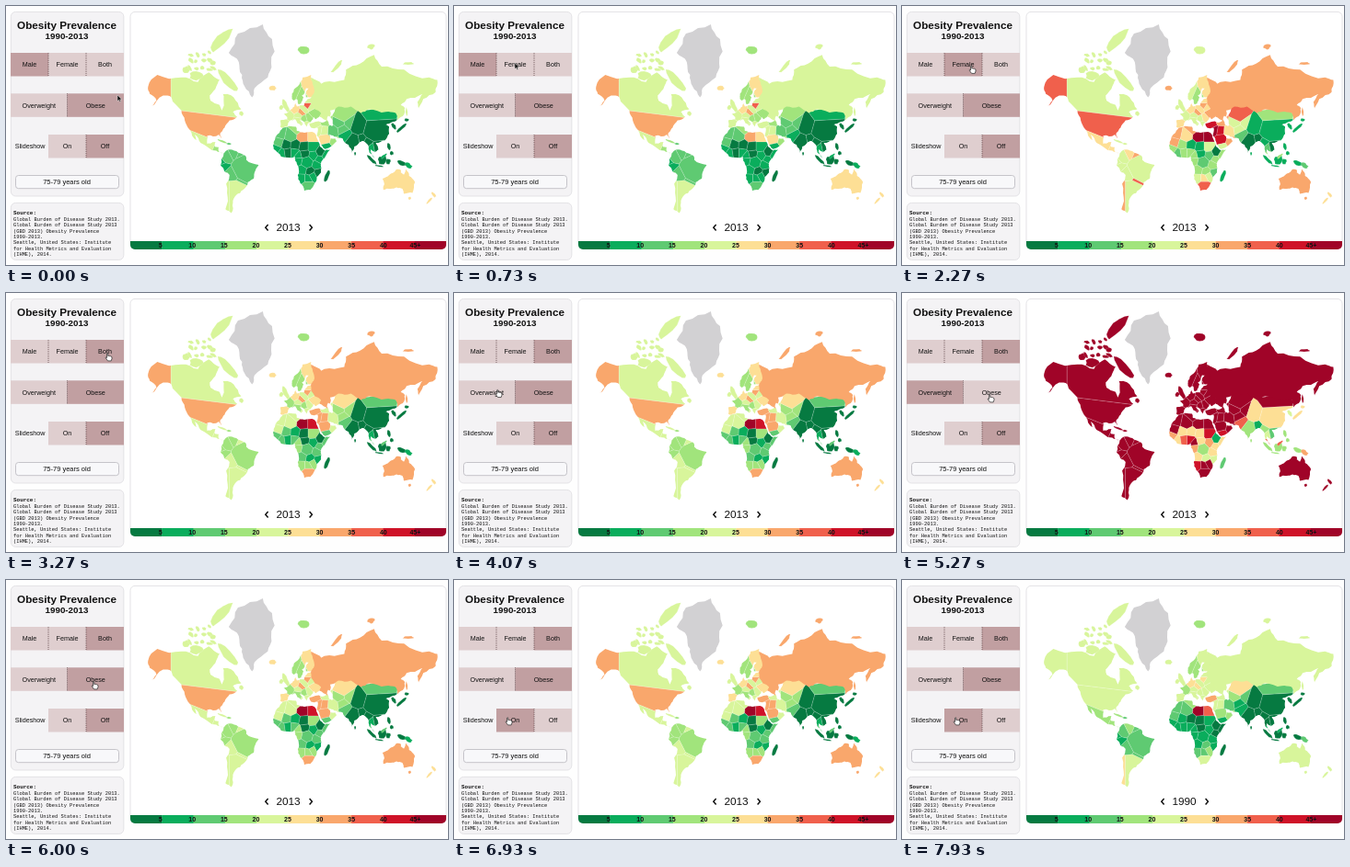
An HTML page that plays this animation: 480 px wide and 282 px high, repeating every 8 s.

```html
<!DOCTYPE html>
<html lang="en">
<head>
<meta charset="utf-8">
<title>Obesity Prevalence</title>
<style>
  html, body { margin: 0; width: 100%; height: 100%; overflow: hidden; background: #fefefe; }
  svg { display: block; width: 480px; height: 282px; }
  text { font-family: "Liberation Sans", Arial, sans-serif; fill: #111; }
  .mid { text-anchor: middle; }
  .ui { font-size: 7.2px; }
  .mono text { font-family: "Liberation Mono", "Courier New", monospace; font-size: 5.37px; }
  .panel { fill: #f4f3f5; stroke: #dddce0; stroke-width: .8; }
  .dots { stroke: #5d4548; stroke-width: .8; stroke-dasharray: 1 1; }
  #map path { stroke: #fff; stroke-opacity: .6; stroke-width: .25; stroke-linejoin: round; }
</style>
</head>
<body>
<svg viewBox="0 0 480 282">
  <defs id="defs">
    <clipPath id="foot"><rect x="135" y="240" width="343" height="25" rx="5"/></clipPath>
  </defs>
  <rect class="panel" x="5.4" y="6.4" width="122.4" height="200.6" rx="5"/>
  <text class="mid" x="66" y="24.5" font-size="11.7" font-weight="700">Obesity Prevalence</text>
  <text class="mid" x="66" y="36" font-size="9.8" font-weight="700">1990-2013</text>
  <g id="buttons"></g>
  <text class="ui" x="9.7" y="155.3">Slideshow</text>
  <rect x="10.5" y="184.5" width="112" height="14.2" rx="3" fill="#f8f8fa" stroke="#b9b8be" stroke-width=".8"/>
  <text class="mid" x="66" y="194.3" font-size="7.5">75-79 years old</text>

  <rect class="panel" x="5.4" y="214.4" width="122.4" height="62" rx="5"/>
  <g class="mono" id="notes">
    <text x="8" y="226.5" style="font-size:5.95px" font-weight="700">Source:</text>
  </g>

  <rect x="135" y="6.4" width="343" height="258.2" rx="5" fill="#fff" stroke="#dddce0" stroke-width=".8"/>
  <g id="map"></g>
  <g id="legend" clip-path="url(#foot)"></g>
  <text id="year" class="mid" x="306.5" y="245" font-size="11.8">2013</text>
  <path d="M284.6 238l-2.8 3.2 2.8 3.2M329.6 238l2.8 3.2-2.8 3.2" fill="none" stroke="#111" stroke-width="1.5"/>

  <path id="arrow" d="M0 0V6.6L1.6 5.2 2.7 7.6 3.8 7.1 2.7 4.8H4.8Z" fill="#111" stroke="#fff" stroke-width=".4"/>
  <path id="hand" d="M1.6.6Q2.2-.3 2.8.6V3Q4 2.5 4.6 3.2 5.6 2.9 6 3.7 7 3.6 7 4.6V6L6.2 8.4H2.6L.3 5.3Q0 4.3 .9 4.4L1.6 5Z" fill="#fff" stroke="#222" stroke-width=".7"/>
</svg>
<script>
const LOOP = 8000;
const palette = ['#067a41', '#0aad5c', '#5fca72', '#a1e47c', '#d8f59b',
                 '#fddf95', '#f9a76c', '#f0604c', '#cf1228', '#a00428'];
const $ = id => document.getElementById(id);

function add(parent, tag, attrs, text) {
  const el = document.createElementNS('http://www.w3.org/2000/svg', tag);
  for (const k in attrs) el.setAttribute(k, attrs[k]);
  if (text) el.textContent = text;
  parent.appendChild(el);
  return el;
}

let seed = 7;
const rnd = () => (seed = seed * 16807 % 2147483647) / 2147483647;

// Mercator
function project(lon, lat) {
  const k = 51.7, rad = Math.PI / 180;
  return [306 + k * lon * rad, 167.5 - k * Math.log(Math.tan(Math.PI / 4 + lat * rad / 2))];
}
const toPath = poly => 'M' + poly.map(p => p.map(v => v.toFixed(1)).join(' ')).join('L') + 'Z';

// Midpoint displacement turns a few key points into a rugged coast
function rough(poly, depth = 2) {
  if (!depth) return poly;
  return rough(poly.flatMap((a, i) => {
    const b = poly[(i + 1) % poly.length], j = (rnd() - .5) * .26;
    const dx = b[0] - a[0], dy = b[1] - a[1];
    return [a, [a[0] + dx / 2 - dy * j, a[1] + dy / 2 + dx * j]];
  }), depth - 1);
}

// Part of a polygon where the linear function f is negative
function cut(poly, f) {
  return poly.flatMap((a, i) => {
    const b = poly[(i + 1) % poly.length], fa = f(a), fb = f(b), out = fa <= 0 ? [a] : [];
    if (fa * fb < 0) out.push(a.map((v, n) => v + (b[n] - v) * fa / (fa - fb)));
    return out;
  });
}
const power = (s, p) => (p[0] - s.x) ** 2 + (p[1] - s.y) ** 2 - s.r ** 2;

const lands = [];
function land(parent, steps, poly) {
  if (poly.length) lands.push({ steps, el: add(parent, 'path', { d: toPath(poly) }) });
}

// A coast is shared out by nearest centre, weighted by radius.
// Each line: name, colour step in the five views, centre, radius.
// Views: men, women, both, overweight, 1990.
function region(coast, countries) {
  const shore = rough(coast.split(' ').map(p => project(...p.split(',').map(Number))));
  const id = 'coast' + lands.length;
  add(add($('defs'), 'clipPath', { id }), 'path', { d: toPath(shore) });
  const g = add($('map'), 'g', { 'clip-path': `url(#${id})` });
  const sites = countries.trim().split('\n').map(line => {
    const [, steps, lon, lat, r = 0] = line.trim().split(/\s+/);
    const [x, y] = project(+lon, +lat);
    return { steps, x, y, r: +r };
  });
  for (const s of sites) {
    let cell = [[130, 0], [480, 0], [480, 280], [130, 280]];
    for (const o of sites) if (o !== s) cell = cut(cell, p => power(s, p) - power(o, p));
    land(g, s.steps, cell);
  }
}

// Rugged ellipse: centre in degrees, half sizes in pixels, turn in degrees
function blob(lon, lat, a, b, turn = 0) {
  const [x, y] = project(lon, lat), c = Math.cos(turn * Math.PI / 180), s = Math.sin(turn * Math.PI / 180);
  return Array.from({ length: 12 }, (_, i) => {
    const t = i * Math.PI / 6, q = .8 + .4 * rnd(), u = a * q * Math.cos(t), v = b * q * Math.sin(t);
    return [x + u * c - v * s, y + u * s + v * c];
  });
}
const isle = (steps, ...shape) => land($('map'), steps, blob(...shape));

// Americas
region('-168,66 -157,71 -128,70 -108,68 -95,72 -82,69 -86,66 -94,61 -93,58 -82,55 -79,51 -77,56 -78,62 -73,62 -65,60 -56,52 -66,50 -61,46 -70,43 -76,36 -81,31 -80,25 -83,29 -97,28 -97,19 -90,21 -87,21 -88,16 -83,15 -83,10 -78,8 -86,11 -105,20 -112,29 -110,23 -118,34 -124,43 -128,51 -140,60 -150,61 -165,54 -158,58 -166,62', `
  Alaska   67694 -182 56 18
  Canada   44494 -99 56 18
  USA      67694 -102 40 18
  Mexico   45493 -112 18.5 18
  Isthmus  35493 -82 6`);
region('-77,8 -72,12 -62,10.5 -51,5 -50,0 -35,-6 -39,-13 -41,-22 -48,-26 -54,-34 -62,-39 -66,-46 -68,-54 -75,-51 -73,-37 -70,-18 -76,-14 -81,-6 -80,1', `
  Brazil    24392 -51 -10 15
  Argentina 44494 -65 -36 14
  Chile     46495 -76 -36 14
  Bolivia   24492 -67 -18 9
  Peru      14391 -76 -9 5
  Paraguay  27492 -58 -23 6.5
  Colombia  24392 -73 4 7
  Venezuela 25393 -65 8 7
  Ecuador   14391 -79 -1.5 4
  Guyana    26492 -58 5 6`);
region('-71,78 -60,82 -30,83.4 -19,81 -20,75 -24,70 -40,65 -43,60 -52,66 -55,71 -59,75.5', 'Greenland ----- -40 72');

// Africa
region('-6,36 10,37 11,33 20,31 32,31 37,21 43,12 51,12 44,2 40,-4 40,-15 35,-20 32,-28 27,-34 20,-35 15,-27 12,-18 13,-9 9,-1 9,4 -8,4 -17,13 -17,21 -10,31', `
  Morocco    26492 -8 30
  Algeria    25492 3 28 3
  Tunisia    36493 10 35
  Libya      69999 18 27
  Egypt      59897 30 27
  Mauritania 26492 -11 20
  Mali       03251 -2 17.5
  Niger      01150 9 17
  Chad       01050 19 15
  Sudan      14381 30 15
  Ethiopia   00010 39 9
  Somalia    13250 46 5
  Kenya      13250 38 .5
  Tanzania   13251 34.5 -6
  Uganda     12161 31 5
  Nigeria    13281 8 9
  Cameroon   13391 12.5 5
  Centre     01050 20 7
  Senegal    13261 -14 13
  Ivory      12251 -7 8
  Ghana      03171 -.5 9
  Gabon      13361 13 -1
  Congo      12231 23 -3 4
  Angola     13251 17.5 -12
  Zambia     03142 27 -14
  Mozambique 02141 36.5 -16
  Zimbabwe   14393 30 -19
  Namibia    14382 17 -22
  Botswana   15392 24 -22
  South      27694 24 -30 3`);

// Eurasia
region('26,40 41,41 50,45 60,56 78,56 90,51 120,54 133,48 131,43 122,40 118,39 122,37 122,30 117,23 106,20 109,12 105,9 100,13 104,2 98,9 97,17 91,22 87,21 80,16 77,8 73,18 66,25 56,27 49,30 51,25 57,25 59,22 45,13 39,21 35,28 36,36 28,36', `
  Turkey     48696 34 39
  Caucasus   36494 45 42
  Syria      49694 37 34
  Iraq       48694 44 33
  Saudi      58693 45 24 3
  Yemen      14281 47 15.5
  Oman       36493 56 21
  Iran       25492 54 32.5 3
  Uzbekistan 24393 62 40.5
  Kazakhstan 37595 67 48 6
  Kyrgyzstan 24392 74 41
  Afghan     24391 66 34
  Pakistan   12271 69 29
  India      00030 79 22 4
  Bangladesh 00010 90.5 24
  China      01050 104 34 11
  Xinjiang   01050 86 38 7
  Mongolia   13292 103 47 6
  Myanmar    01030 96 21 3
  Thailand   12140 101 15
  Vietnam    00020 106 16
  Malaysia   13271 102 4`);
region('-9,43 -1,44 -1,46 -5,48 2,51 8,54 9,57 11,54 20,55 21,57 24,59 30,60 33,54 40,50 40,47 34,44 31,46 28,42 24,40 23,37 19,42 13,45 18,40 16,38 9,44 3,43 -1,37 -6,36 -9,37', `
  Spain     45594 -4 40
  France    44393 2.5 47
  Italy     44394 12 43
  Germany   55595 9.5 51.5
  Alps      44494 13 47.5
  Czechia   66695 16 49.8
  Poland    45494 19.5 52
  Balkans   34394 20 44
  Greece    44494 22 39.5
  Romania   35494 25.5 45
  Ukraine   36594 32 49 3
  Belarus   45494 28 53.5
  Lithuania 76695 24 55
  Estonia   45594 24 58`);
region('28,70 41,67 35,64 44,68 68,69 70,73 87,75 104,77.5 113,74 140,73 170,70 180,69 178,63 163,59 157,51 156,57 162,62 143,59 136,55 141,53 140,48 132,43 130,49 118,50 98,52 88,49 76,54 61,54 51,51 48,42 38,46 40,49 28,56 28,60', 'Russia 46694 100 60');
region('5,59 5,62 12,66 18,70 28,71 30,67 31,62 27,60 22,60 22,63 25,65 22,65 17,61 19,60 16,56 13,55.5 11,59 7,58', `
  Norway  34393 9 63
  Sweden  33393 16.5 61.5
  Finland 55594 26 64`);
region('114,-22 122,-18 130,-12 136,-12 136,-15 140,-17.5 142,-11 146,-19 153,-26 150,-37 140,-38 138,-33 131,-31.5 124,-33 115,-34', 'Australia 56694 134 -25');
add($('map'), 'path', { d: toPath(blob(51, 42, 5.5, 2.4, 70)), fill: '#fff' });

// Arctic islands
isle('44494', -80, 80.8, 18, 6, -45);
isle('44494', -73, 69, 15, 4.5, 48);
isle('44494', -110, 70.7, 7, 4.5);
isle('44494', -122, 73, 4, 4);
for (let i = 0; i < 14; i++)
  isle('44494', -118 + i % 5 * 7 + rnd() * 4, 73 + Math.floor(i / 5) * 2.1 + rnd(), 2 + 2 * rnd(), 1.5 + rnd(), 60 * rnd());
isle('34393', 19, 78.7, 6, 4);
isle('46694', 59, 74, 9, 2, -50);
isle('46694', 100, 79.5, 4, 3);
isle('46694', 145, 75, 6, 1.5);
isle('46694', 143, 50, 4.5, 1, 85);

// Other islands
isle('44494', -56, 48.7, 2.6, 2.4);
isle('34493', -79, 21.8, 5, 1, 20);
isle('24392', -71, 19, 2.4, 1.1);
isle('56594', -18.5, 65, 4.5, 2.6);
isle('44494', -2.3, 54, 7.5, 2.5, 65);
isle('44494', -8, 53.3, 2.2, 2.6);
isle('01020', 47, -19, 6.8, 2.2, -68);
isle('01030', 81, 7.5, 1, 1.8);
isle('01040', 127.5, 37.5, 4, 1.9, 60);
isle('01050', 137, 36, 7, 1.8, -42);
isle('01050', 143, 43.3, 2.2, 1.8);
isle('01030', 121.5, 16, 1.8, 3.6, -10);
isle('01030', 125, 8, 2, 2);
isle('01030', 114, 0, 5, 4.4, -50);
isle('13271', 115.5, 4.3, 4, 1.4, -40);
isle('01030', 101, 0, 7.2, 1.8, 45);
isle('01030', 110, -7.4, 4.6, .8, 8);
isle('01030', 121, -2, 2.4, 3);
isle('01030', 137, -4, 5, 2.4, 25);
isle('12162', 145, -6.5, 4.6, 2.4, 30);
isle('56694', 146.7, -42, 1.7, 1.7);
isle('55594', 175.5, -38.5, 3.6, 1.4, 55);
isle('55594', 170.5, -44, 4.6, 1.3, -48);

`Global Burden of Disease Study 2013.
Global Burden of Disease Study 2013
(GBD 2013) Obesity Prevalence
1990-2013.
Seattle, United States: Institute
for Health Metrics and Evaluation
(IHME), 2014.`.split('\n').forEach((line, i) => add($('notes'), 'text', { x: 8, y: 234 + i * 6.37 }, line));

palette.forEach((fill, i) =>
  add($('legend'), 'rect', { x: 135 + i * 34.3, y: 256, width: 34.6, height: 9, fill }));
for (let i = 1; i < 10; i++)
  add($('legend'), 'text', { class: 'mid', x: 133 + i * 34.6, y: 263, 'font-size': 7, 'font-weight': 700 },
    i * 5 + (i === 9 ? '+' : ''));

function buttonRow(y, left, labels) {
  const width = (128 - left) / labels.length;
  return labels.map((label, i) => {
    const x = left + i * width;
    const rect = add($('buttons'), 'rect', { x, y, width, height: 25.5 });
    add($('buttons'), 'text', { class: 'ui mid', x: x + width / 2, y: y + 15.3 }, label);
    if (i) add($('buttons'), 'line', { class: 'dots', x1: x, x2: x, y1: y, y2: y + 25.5 });
    return rect;
  });
}
const rows = [
  buttonRow(51, 5, ['Male', 'Female', 'Both']),
  buttonRow(95.3, 5, ['Overweight', 'Obese']),
  buttonRow(140, 46, ['On', 'Off'])
];

// start time, data view, then the chosen button in each row
const scenes = [
  [0, 0, 0, 1, 1], [2270, 1, 1, 1, 1], [3000, 2, 2, 1, 1], [4200, 3, 2, 0, 1],
  [5400, 2, 2, 1, 1], [6470, 2, 2, 1, 0], [7870, 4, 2, 1, 0]
];
// pointer moves: from, to, x, y
const moves = [
  [0, 1, 121, 97], [270, 730, 66, 62], [870, 1000, 73, 65], [2270, 2600, 108, 65.5],
  [3600, 4200, 36.5, 110.5], [4470, 5270, 93, 110.5], [6000, 6470, 56, 149.5]
];

function pointerAt(t) {
  let [, , x, y] = moves[0];
  for (const [from, to, nx, ny] of moves) {
    const p = Math.min(1, Math.max(0, (t - from) / (to - from)));
    const e = p * p * (3 - 2 * p);
    x += (nx - x) * e;
    y += (ny - y) * e;
  }
  return `translate(${x} ${y})`;
}

let shown;
function show(scene) {
  if (scene === shown) return;
  shown = scene;
  const [, view, ...chosen] = scene;
  lands.forEach(l => l.el.setAttribute('fill', palette[l.steps[view]] || '#d2d1d3'));
  rows.forEach((row, r) => row.forEach((rect, i) =>
    rect.setAttribute('fill', i === chosen[r] ? '#c19fa1' : '#dfcecf')));
  $('year').textContent = view === 4 ? '1990' : '2013';
}

function frame(now) {
  const t = now % LOOP;
  show(scenes.filter(s => s[0] <= t).pop());
  const pos = pointerAt(t), isArrow = t < 870;
  for (const id of ['arrow', 'hand']) {
    $(id).setAttribute('transform', pos);
    $(id).setAttribute('visibility', (id === 'arrow') === isArrow ? 'visible' : 'hidden');
  }
  requestAnimationFrame(frame);
}
frame(0);
</script>
</body>
</html>
```
